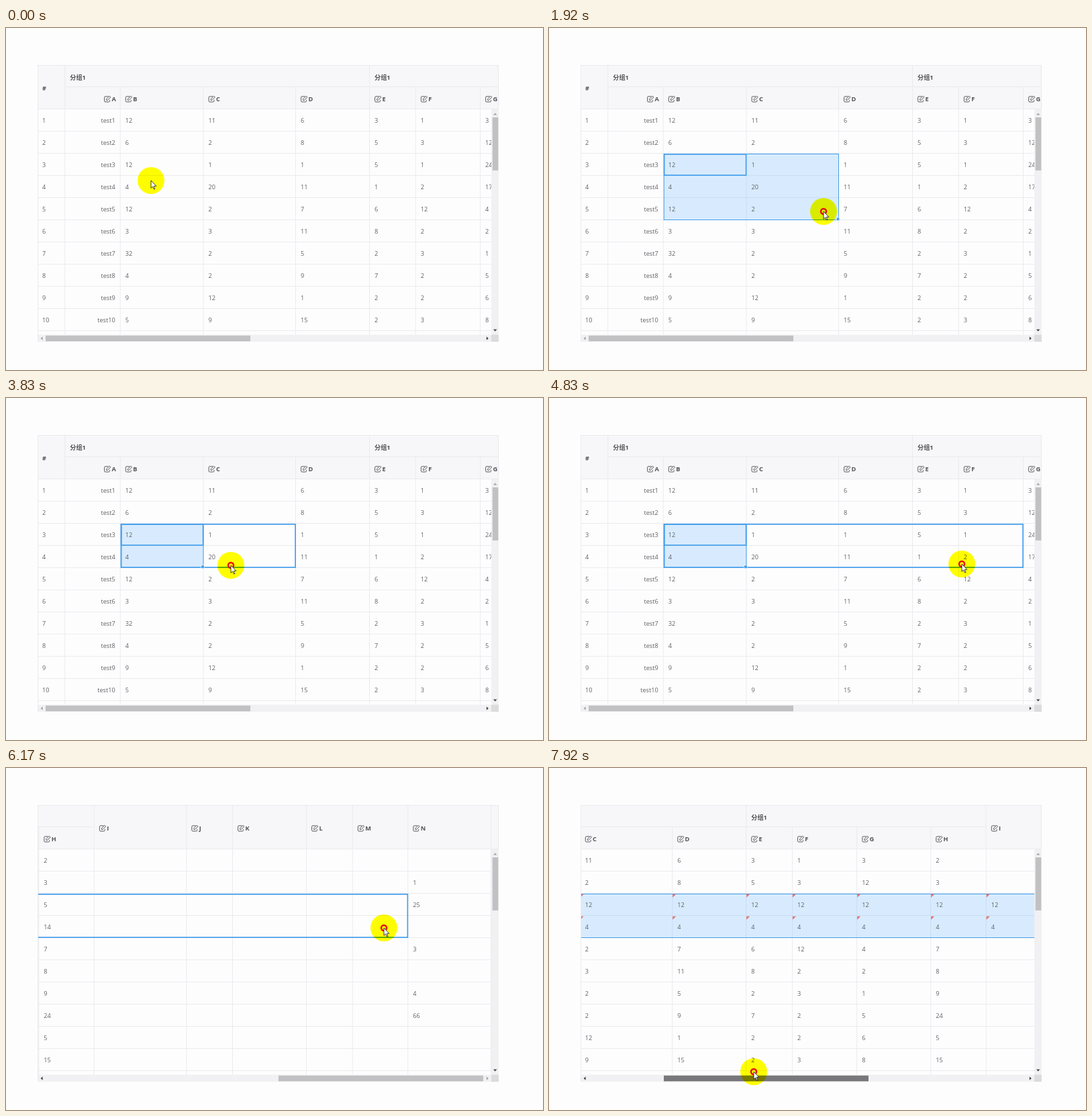
Animation, 800 px wide and 509 px high, one loop 8 s. Source, as an HTML page:

```html
<!DOCTYPE html>
<html lang="zh">
<head>
<meta charset="utf-8">
<title>Table range fill</title>
<style>
  html, body { margin: 0; width: 100%; height: 100%; overflow: hidden; background: #fefdfe; }
  svg { display: block; width: 100vw; height: 100vh; }
  text { font: 9.2px 'Open Sans', 'Noto Sans', 'Noto Sans CJK SC', 'Noto Sans CJK', sans-serif; fill: #606266; }
  .head text { font-weight: 700; fill: #505257; }
  .line { stroke: #ebebef; fill: none; }
  .icon { fill: none; stroke: #505257; stroke-width: .95; stroke-linejoin: round; }
  .area { fill: #409eff; fill-opacity: .2; stroke: #459fec; }
  .frame { fill: none; stroke: #459fec; stroke-width: 1.7; }
  .handle { fill: #459fec; stroke: #fff; stroke-width: .6; }
  .mark { fill: #e2726c; }
  .spot { fill: #ff0; mix-blend-mode: multiply; }
</style>
</head>
<body>
<svg id="stage" viewBox="0 0 800 509"></svg>
<script>
const LEFT = 47, TOP = 55, BODY = 121, ROW = 33, RIGHT = 723, BOTTOM = 456.5, EDGE = 734, END = 467;
const MAX_SCROLL = 767.75, THUMB_X = 59, THUMB_W = 305, TRAVEL = 347, GRAB_X = 540, UNIT = 13.75;
const B = 2, C = 3, M = 13, ROWS = 10;

const count = prefix => Array.from({ length: ROWS }, (_, i) => prefix + (i + 1)).join(' ');

// Column name, width in units and cell values
const columns = [
  ['#', 3, count('')],
  ['A', 6, count('test')],
  ['B', 9, '12 6 12 4 12 3 32 4 9 5'],
  ['C', 10, '11 2 1 20 2 3 2 2 12 9'],
  ['D', 8, '6 8 1 11 7 11 5 9 1 15'],
  ['E', 5, '3 5 5 1 6 8 2 7 2 2'],
  ['F', 7, '1 3 1 2 12 2 3 2 2 3'],
  ['G', 8, '3 12 24 17 4 2 1 5 6 8'],
  ['H', 6, '2 3 5 14 7 8 9 24 5 15'],
  ['I', 10, ''], ['J', 5, ''], ['K', 8, ''], ['L', 5, ''], ['M', 6, ''],
  ['N', 9, '- 1 25 - 3 - 4 66']
];
let edge = LEFT;
const cols = columns.map(([name, width, values]) => {
  const x = edge;
  edge += width * UNIT;
  return { name, x, end: edge, values: values ? values.split(' ') : [] };
});
const TABLE_END = edge;

// Pointer path: tick (1/12 s), x, y
const path = [
  [0, 216, 227], [2, 204, 222], [5, 196, 207], [12, 216, 206], [16, 245, 197], [18, 340, 245],
  [20, 407, 276], [23, 409, 273], [26, 290, 246], [28, 275, 239], [32, 298, 256], [38, 293, 251],
  [42, 302, 252], [44, 296, 253], [46, 335, 249], [50, 471, 252], [55, 590, 249], [57, 615, 247],
  [61, 615, 247], [62, 683, 255], [64, 764, 248], [68, 760, 241], [74, 563, 238], [76, 563, 239],
  [80, 546, 270], [84, 541, 437], [86, 538, 464], [88, 540, 463], [92, 405, 455], [95, 305, 452]
];
const presses = [[11, 28], [39, 77], [88, 96]];

const rect = (x, y, x2, y2, attrs) => `<rect x="${x}" y="${y}" width="${x2 - x}" height="${y2 - y}" ${attrs}/>`;
const line = (x, y, x2, y2) => `<path class="line" d="M${x} ${y}L${x2} ${y2}"/>`;
const label = (x, y, text, anchor = 'start') => `<text x="${x}" y="${y + 3.5}" text-anchor="${anchor}">${text}</text>`;
const rowY = r => BODY + r * ROW;
const midY = r => rowY(r) + 16.5;

function titleCell(col, i) {
  if (!i) return label(col.x + 7, 89, '#');
  const x = i === 1 ? col.end - 24.75 : col.x + 7;
  const y = i < 9 ? 105.5 : 89.5;
  return `<g class="icon" transform="translate(${x} ${y - 5})">
    <path d="M6.5 1.4H2A1.4 1.4 0 0 0 .6 2.8v5.3A1.4 1.4 0 0 0 2 9.5h5.1a1.4 1.4 0 0 0 1.4-1.4V6.6"/>
    <path d="M3.7 6.9V5.1L8.1.7 9.8 2.4 5.4 6.9Z"/></g>` + label(x + 11.4, y, col.name);
}

function header() {
  const dividers = cols.map((c, i) => line(c.end - .5, i === 0 || i === 4 || i > 7 ? TOP : 87.5, c.end - .5, BODY)).join('');
  return dividers + line(cols[1].x, 87.5, cols[8].end, 87.5) +
    label(cols[1].x + 7, 73, '分组1') + label(cols[5].x + 7, 73, '分组1') + cols.map(titleCell).join('');
}

const isFilled = (i, r) => i >= C && i <= M && (r === 2 || r === 3);

function cells(keep) {
  return cols.map((c, i) => c.values.map((v, r) => {
    if (v === '-' || !keep(i, r)) return '';
    return i === 1 ? label(c.end - 8, midY(r), v, 'end') : label(c.x + 7, midY(r), v);
  }).join('')).join('');
}

function filledCells() {
  return cols.slice(C, M + 1).map(c => [2, 3].map(r =>
    `<path class="mark" d="M${c.x} ${rowY(r) + .7}h5l-5 5z"/>` +
    label(c.x + 7, midY(r), cols[B].values[r])).join('')).join('');
}

function grid() {
  const down = cols.map(c => line(c.end - .5, BODY, c.end - .5, BOTTOM)).join('');
  const across = Array.from({ length: ROWS }, (_, r) => line(LEFT, rowY(r + 1) - .5, TABLE_END, rowY(r + 1) - .5)).join('');
  return down + across;
}

const stage = document.getElementById('stage');
stage.innerHTML = `
  <defs>
    <clipPath id="headClip">${rect(LEFT, TOP, EDGE, BODY, '')}</clipPath>
    <clipPath id="bodyClip">${rect(LEFT, BODY, RIGHT, BOTTOM, '')}</clipPath>
  </defs>
  ${rect(0, 0, 800, 509, 'fill="#fefdfe"')}
  ${rect(LEFT, TOP, EDGE, BODY, 'fill="#f7f6f8"')}
  <g class="head" clip-path="url(#headClip)"><g id="headRow">${header()}</g></g>
  ${line(LEFT, 120.5, EDGE, 120.5)}
  <g clip-path="url(#bodyClip)"><g id="bodyRows">
    ${grid()}
    <rect id="area" class="area"/>
    ${cells((i, r) => !isFilled(i, r))}
    <g id="before">${cells(isFilled)}</g>
    <g id="after">${filledCells()}</g>
    <rect id="active" class="frame"/>
    <rect id="extend" class="frame"/>
    <rect id="handle" class="handle" width="4.6" height="4.6"/>
  </g></g>
  ${rect(RIGHT, BODY, EDGE, BOTTOM, 'fill="#f1f0f2"')}
  ${rect(LEFT, BOTTOM, RIGHT, END, 'fill="#f1f0f2"')}
  ${rect(RIGHT, BOTTOM, EDGE, END, 'fill="#dcdcdc"')}
  ${rect(724.7, 133, 733.3, 212, 'fill="#c1c0c2"')}
  <rect id="thumb" y="457.7" width="${THUMB_W}" height="8.6"/>
  <path fill="#a3a3a3" d="M726 129.5h5.4l-2.7-3z"/>
  <path fill="#404040" d="M726 448.5h5.4l-2.7 3z"/>
  <path id="arrowLeft" d="M54.6 459.2v5.4l-3-2.7z"/>
  <path id="arrowRight" d="M715.8 459.2v5.4l3-2.7z"/>
  <path class="line" d="M47.5 ${END}V55.5H733.5V${BODY}"/>
  <g id="pointer">
    <circle class="spot" r="20"/>
    <circle id="ring" r="4" fill="none" stroke="#e8100c" stroke-width="2.5"/>
    <path d="M0 0V11.3L2.6 8.9 4.4 13 6 12.3 4.3 8.3H7.8Z" fill="#fff" stroke="#111" stroke-width=".8"/>
  </g>`;

const el = {};
stage.querySelectorAll('[id]').forEach(node => el[node.id] = node);

const set = (node, attrs) => Object.entries(attrs).forEach(([k, v]) => node.setAttribute(k, v));
const show = (node, on) => set(node, { visibility: on ? 'visible' : 'hidden' });

function outline(node, lastCol, lastRow, inset) {
  const { x } = cols[B], y = rowY(2);
  set(node, {
    x: x + inset, y: y + inset,
    width: cols[lastCol].end - x - 2 * inset, height: rowY(lastRow + 1) - y - 2 * inset
  });
}

function pointerAt(tick) {
  const i = Math.max(1, path.findIndex(p => p[0] >= tick));
  const [t0, x0, y0] = path[i - 1], [t1, x1, y1] = path[i];
  const k = (tick - t0) / (t1 - t0);
  return [x0 + (x1 - x0) * k, y0 + (y1 - y0) * k];
}

function scrollAt(tick, x) {
  const part = tick < 88 ? (tick - 63) / 5 : 1 - (GRAB_X - x) / TRAVEL;
  return MAX_SCROLL * Math.min(1, Math.max(0, part));
}

const columnAt = x => Math.max(B, cols.findIndex(c => x < c.end));

function draw(tick) {
  const [x, y] = pointerAt(tick);
  const scroll = scrollAt(tick, x);
  const extending = tick >= 40 && tick < 77, filled = tick >= 77, selected = tick >= 12;

  let lastCol = B, lastRow = 3;
  if (filled) lastCol = M;
  else if (tick < 26) {
    lastCol = columnAt(x);
    lastRow = Math.max(2, Math.floor((y - BODY) / ROW));
  }
  outline(el.area, lastCol, lastRow, .5);
  outline(el.active, B, 2, .9);
  outline(el.extend, columnAt(Math.min(x, RIGHT - 1) + scroll), 3, .9);
  set(el.handle, { x: cols[lastCol].end - 3.8, y: rowY(lastRow + 1) - 4 });
  [el.area, el.active, el.handle].forEach(node => show(node, selected));
  show(el.extend, extending);
  show(el.before, !filled);
  show(el.after, filled);

  [el.headRow, el.bodyRows].forEach(node => set(node, { transform: `translate(${-scroll} 0)` }));
  set(el.thumb, { x: THUMB_X + TRAVEL * scroll / MAX_SCROLL, fill: tick >= 88 ? '#787779' : '#c1c0c2' });
  set(el.arrowLeft, { fill: scroll > 0 ? '#404040' : '#a3a3a3' });
  set(el.arrowRight, { fill: scroll < MAX_SCROLL ? '#404040' : '#a3a3a3' });
  set(el.pointer, { transform: `translate(${x} ${y})` });
  show(el.ring, presses.some(([from, to]) => tick >= from && tick < to));
}

const start = performance.now();
function play() {
  const time = Math.max(0, performance.now() - start) % 8000;
  let tick = Math.min(95, Math.floor((time + 5) * 12 / 1000));
  // Every sixth tick holds the previous picture
  if (tick % 6 === 3) tick--;
  draw(tick);
  requestAnimationFrame(play);
}
play();
</script>
</body>
</html>
```
